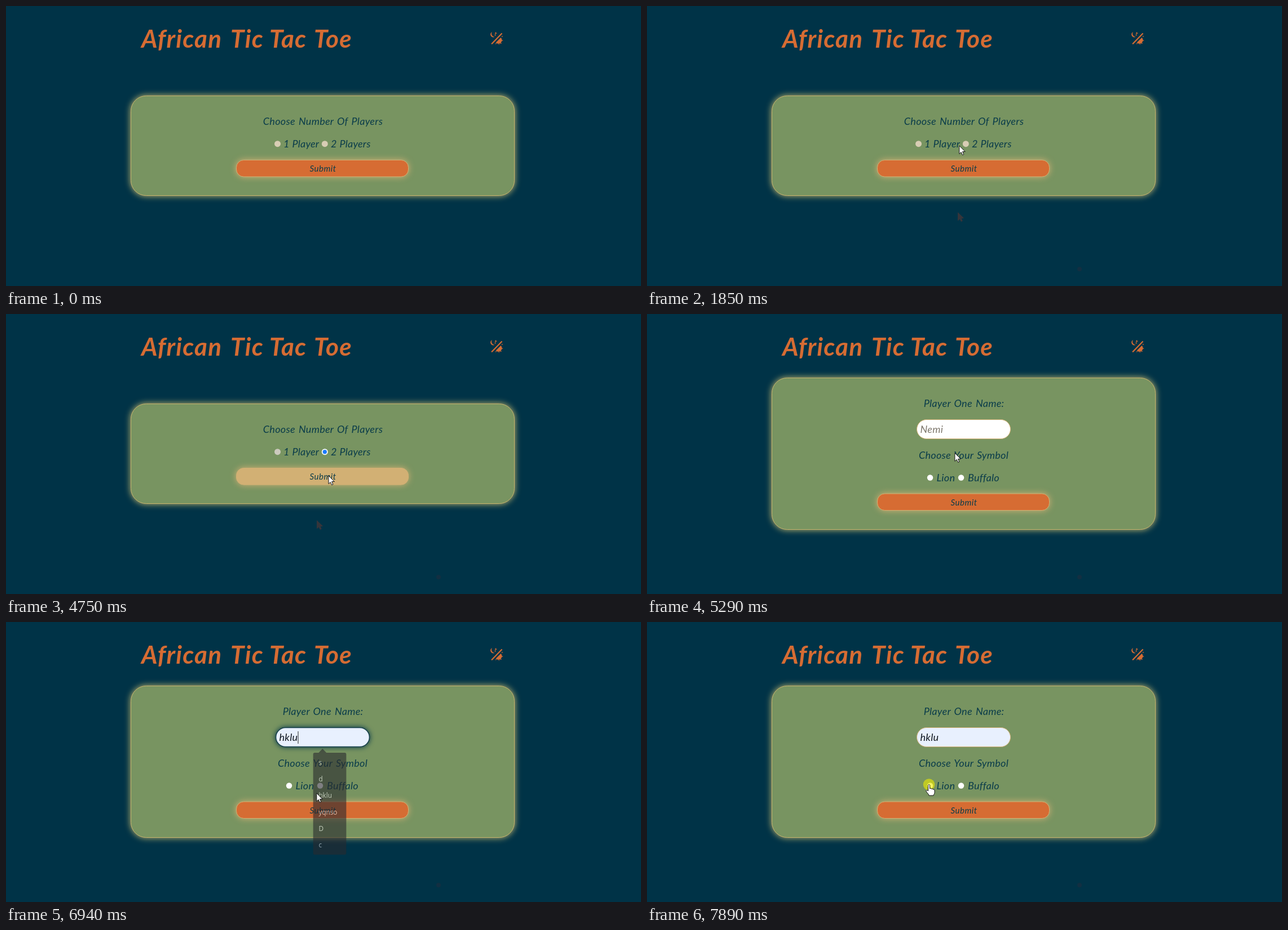
These frames come from a looping animation (1126x497 px, 8 s). An HTML page:

```html
<!DOCTYPE html>
<html lang="en">
<meta charset="utf-8">
<title>African Tic Tac Toe</title>
<style>
  html, body { margin: 0; width: 100%; height: 100%; overflow: hidden; background: #003347; }
  svg { display: block; width: 1126px; height: 497px; }
  text { font: italic 18px Lato, sans-serif; letter-spacing: .3px; word-spacing: 1.5px; fill: #0a3c4a; }
  .mid { text-anchor: middle; }
  .option { letter-spacing: .2px; word-spacing: .5px; }
  .title { font-size: 44px; font-weight: 700; letter-spacing: 1.2px; fill: #d66c33; }
  .submit { font-size: 15px; letter-spacing: .5px; text-anchor: middle; }
  .card { fill: #789461; stroke: #c8b46e; filter: drop-shadow(0 0 6px #c8bc70); }
  .button { fill: #d66c33; stroke: #d2b074; filter: drop-shadow(0 0 6px #d2b074); }
  .focus { filter: drop-shadow(0 0 5px #003347); }
  #menu text { font: 12px "Open Sans", sans-serif; letter-spacing: 0; fill: #f4f4f8; }
</style>
<svg viewBox="0 0 1126 497">
  <text class="title" y="74"><tspan x="240">African</tspan> <tspan x="398">Tic</tspan> <tspan x="467">Tac</tspan> <tspan x="546">Toe</tspan></text>
  <g fill="#d66c33">
    <path d="M862 46a5 5 0 1 0 5 8.600a5.500 5.500 0 0 1-5-8.600z"/>
    <path d="M861 67.500L879.500 48.500" stroke="#d66c33" stroke-width="2.200"/>
    <path d="M868.500 65L877.500 56A6.200 6.200 0 0 1 868.500 65z"/>
    <path d="M868.500 46l.7 1.600 1.600.7-1.600.7-.7 1.600-.7-1.600-1.600-.7 1.600-.7zM866.500 50.500h2v2h-2z"/>
    <path d="M878 54l2.500-1 .3 2zM879 60l2.500 1-2 1.500zM877 64.500l2 2-2.500.4zM873 66.500l2 .2-.8 2.300zM868 66l1.800.6-1.500 1.700z"/>
  </g>
  <circle id="spot" cx="767" cy="467" r="4" fill="#122f42"/>

  <g id="count">
    <rect class="card" x="221.500" y="159.500" width="680" height="177" rx="27"/>
    <text class="mid" x="562" y="211">Choose Number Of Players</text>
    <circle id="one" cx="481.500" cy="244.700" r="5.500"/>
    <text class="option" x="492" y="251">1 Player</text>
    <circle id="two" cx="565.300" cy="244.700" r="5.500"/>
    <circle id="dot" cx="565.300" cy="244.700" r="3.700" fill="#1b7bff"/>
    <text class="option" x="576" y="251">2 Players</text>
    <rect id="send" class="button" x="408.500" y="273.500" width="305" height="29.500" rx="13"/>
    <text class="submit" x="562" y="293.500">Submit</text>
    <path id="trace" d="M551 366v15.500l3.500-3 2.500 4.500 2.800-1.500-1.800-4 4-1z" fill="#35353b"/>
  </g>

  <g id="name">
    <rect class="card" x="221.500" y="113.500" width="680" height="269" rx="27"/>
    <text class="mid" x="562" y="165">Player One Name:</text>
    <rect id="field" x="478.500" y="187.500" width="166" height="34" rx="17"/>
    <text id="value" x="484.500" y="211"></text>
    <path id="caret" stroke="#222"/>
    <text class="mid" x="561.500" y="256.500">Choose Your Symbol</text>
    <circle cx="502" cy="290.500" r="5.200" fill="#fff"/>
    <text x="513.500" y="296.500">Lion</text>
    <circle cx="557" cy="290.500" r="5.200" fill="#fff"/>
    <text x="569" y="296.500">Buffalo</text>
    <rect class="button" x="408.500" y="319" width="305" height="29.500" rx="13"/>
    <text class="submit" x="562" y="339.500">Submit</text>
    <g id="menu">
      <path d="M547 230h7l7-7 7 7h33q3 0 3 3v179q0 3-3 3h-54q-3 0-3-3v-179q0-3 3-3z" fill="#29292e"/>
      <rect id="row" x="548" y="294" width="52" height="28" rx="3" fill="#45454c"/>
    </g>
  </g>

  <circle id="halo" r="10.300" fill="#ecea00" opacity=".62"/>
  <g id="cursor" fill="#fff" stroke="#111" stroke-linejoin="round">
    <path id="arrow" d="M0 0V14.500l3.300-3 2.300 5 2.300-1-2.200-5h4.600z"/>
    <path id="hand" d="M-1.500 1.500C-1.500-.5 1.500-.5 1.500 1.500V7.500C2 6 4.500 6.500 4.500 8 5 7 7.200 7.200 7.400 9 8 8 10 8.400 10 10.500V14C10 17 8 17.500 8 19.500H0C0 17-5 13.500-5 11.500S-2.500 9.800-1.500 11.500Z"/>
    <path id="beam" d="M-3-8Q0-8 0-6Q0-8 3-8M0-6V6M-3 8Q0 8 0 6Q0 8 3 8" fill="none"/>
  </g>
</svg>
<script>
const $ = id => document.getElementById(id);
const show = (id, on) => $(id).style.display = on ? "" : "none";
const set = (id, attrs) => { for (const k in attrs) $(id).setAttribute(k, attrs[k]); };

["s", "d", "hklu", "yqnso", "D", "c"].forEach((word, i) => {
  const item = document.createElementNS("http://www.w3.org/2000/svg", "text");
  item.textContent = word;
  item.setAttribute("x", 554);
  item.setAttribute("y", 252.5 + i * 29.9);
  $("menu").append(item);
});

// Pointer path: time, x, y
const path = [
  [600, 903, 482], [900, 763, 461], [1360, 551, 366], [1430, 551, 362],
  [1640, 552, 296], [1850, 554, 248], [2200, 486, 242], [2270, 483.5, 241.5],
  [2800, 483.5, 241.5], [3050, 525, 248], [3290, 565.5, 244.5], [4080, 565.5, 244.5],
  [4600, 572, 287], [5080, 572, 287], [5500, 520, 207], [5840, 505, 212],
  [6050, 505, 262], [6260, 539.5, 274], [6670, 560, 308], [6870, 560, 308],
  [7280, 507, 284], [7620, 501, 289], [7690, 500, 288.5], [8000, 500, 288.5]
];

function pointer(t) {
  const i = Math.max(1, path.findIndex(p => p[0] > t));
  const [a, b] = [path[i - 1], path[i]];
  const k = Math.max(0, (t - a[0]) / (b[0] - a[0]));
  return [a[1] + (b[1] - a[1]) * k, a[2] + (b[2] - a[2]) * k];
}

function draw(t) {
  const [x, y] = pointer(t);
  const within = (a, b) => t >= a && t < b;
  const inside = (l, top, r, bottom) => x > l && x < r && y > top && y < bottom;
  const near = (cx, cy) => Math.hypot(x - cx, y - cy) < 9;
  const first = t < 4820;

  show("count", first);
  show("name", !first);
  show("spot", t >= 970);
  show("trace", t >= 1430);

  // Number of players
  set("one", { fill: t < 2270 ? "#d8cdb4" : "#cccabe" });
  set("two", { fill: t < 3290 ? "#d8cdb4" : "#fff" });
  show("dot", t >= 3750);
  $("send").style.fill = inside(408, 273, 714, 303) ? "#d2b074" : "#d66c33";

  // Name entry
  const focused = within(5500, 7690);
  const filled = t >= 6600;
  set("field", {
    class: focused ? "focus" : "",
    fill: filled ? "#e8f0fe" : "#fff",
    stroke: focused ? "#17404b" : "#d2b074",
    "stroke-width": focused ? 1.6 : 1
  });
  $("value").textContent = filled ? "hklu" : "Nemi";
  $("value").style.fill = filled ? "#111820" : "#7d776c";
  show("caret", focused);
  set("caret", { d: `M${t < 6870 ? 484.5 : 518} 194V216` });

  // Suggestion list closes with a quick fade and a faint tail
  const close = Math.min(1, Math.max(0, (t - 6870) / 150));
  show("menu", within(5640, 7620));
  show("row", within(6600, 6870));
  set("menu", {
    opacity: 1 - .85 * close,
    transform: `translate(574 320) scale(${1 - .045 * close}) translate(-574 -320)`
  });

  // Pointer
  const hand = first ? near(481.5, 244.7) || near(565.3, 244.7)
                     : t > 7000 && near(502, 290.5);
  const beam = !first && inside(478, 187, 645, 222);
  show("cursor", t >= 600);
  show("hand", hand);
  show("beam", beam);
  show("arrow", !hand && !beam);
  set("cursor", { transform: `translate(${x} ${y})` });
  show("halo", within(2270, 2540) || within(3620, 3750) || t >= 7830);
  set("halo", { cx: x, cy: y });
}

const start = performance.now();
function tick() {
  draw((performance.now() - start) % 8000);
  requestAnimationFrame(tick);
}
tick();
</script>
</html>
```
